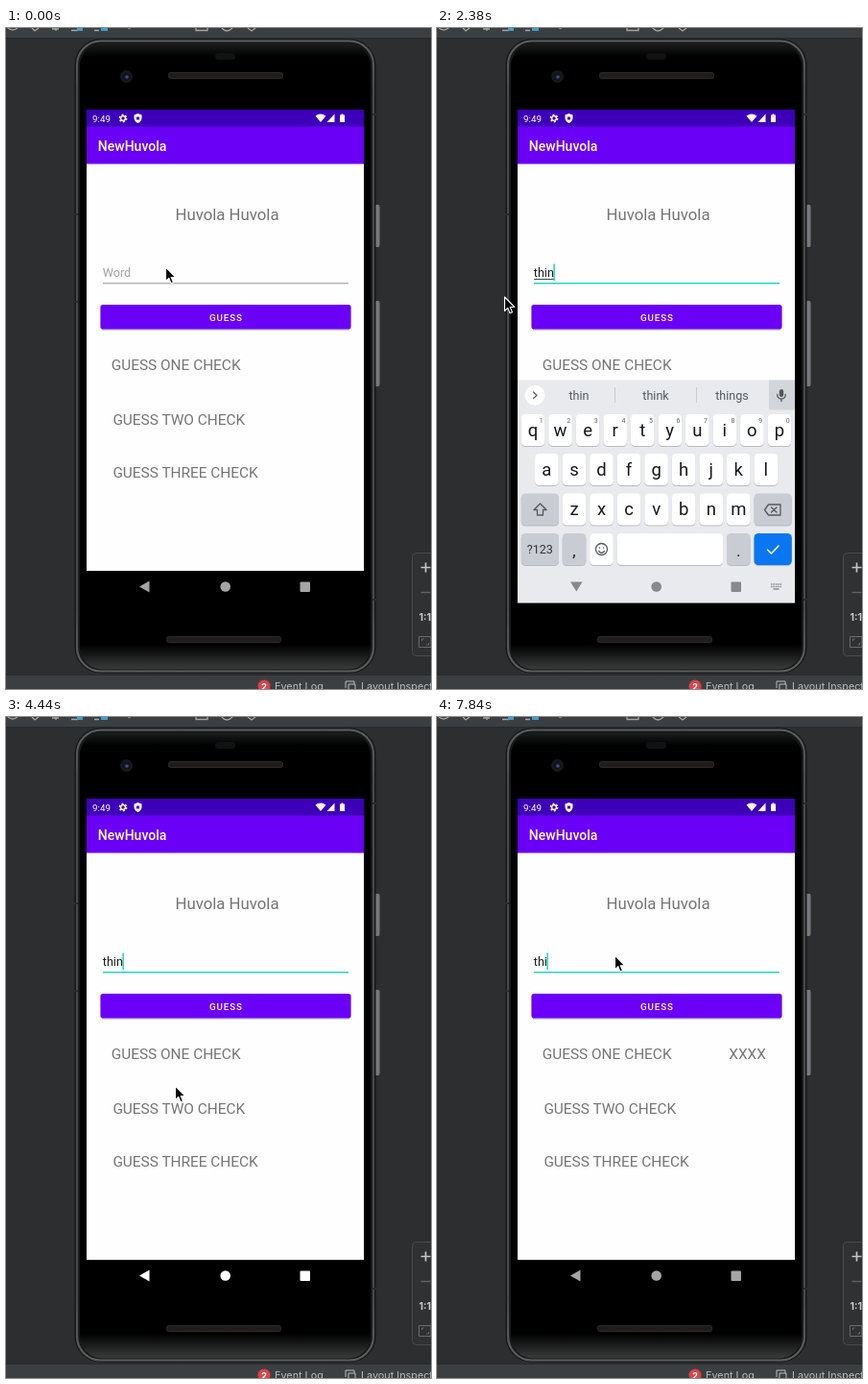
Write an HTML page that moves like this. It is 443x688 px and loops after 7.99 s.

```html
<!DOCTYPE html>
<html lang="en">
<head>
<meta charset="utf-8">
<title>Word game in a phone emulator</title>
<style>
  html, body { margin: 0; width: 100%; height: 100%; overflow: hidden; background: #2c2e30; }
  svg { display: block; width: 443px; height: 688px; font-family: Roboto, sans-serif; }
  .ide { font-family: Inter, sans-serif; fill: #b9bbbd; }
  .mid { text-anchor: middle; }
  .label { font-size: 15.4px; fill: #757575; }
  .line { fill: none; stroke: #55595e; stroke-width: 1.3; stroke-linecap: round; stroke-linejoin: round; }
  .word { font-size: 12.6px; text-anchor: middle; fill: #54595f; }
</style>
</head>
<body>
<svg viewBox="0 0 443 688">
  <defs>
    <linearGradient id="rim" x2="0" y2="1">
      <stop offset="0" stop-color="#5c5e5f"/><stop offset=".08" stop-color="#47494a"/>
      <stop offset=".9" stop-color="#47494a"/><stop offset="1" stop-color="#5c5e5f"/>
    </linearGradient>
    <linearGradient id="body" x2="0" y2="1">
      <stop offset="0" stop-color="#1c1d1d"/><stop offset=".02" stop-color="#000"/>
      <stop offset=".96" stop-color="#000"/><stop offset="1" stop-color="#3a3b3b"/>
    </linearGradient>
    <clipPath id="screenClip"><path d="M84 85H373V599H84Z"/></clipPath>
    <clipPath id="buttonClip"><rect x="98.400" y="288" width="261.200" height="25.500" rx="2.800"/></clipPath>
    <g id="gear" fill="none" stroke="currentColor">
      <circle r="2.9" stroke-width="1.8"/>
      <circle r="4.4" stroke-width="1.5" stroke-dasharray="2.3"/>
    </g>
  </defs>

  <!-- editor around the phone -->
  <path fill="#2c2e30" d="M0 0H443V688H0Z"/>
  <path fill="#3c3f41" d="M0 0H443V10H0ZM0 674H443V688H0Z"/>
  <path fill="#292a2c" d="M0 10H443V11H0ZM0 673H443V674H0Z"/>
  <g fill="none" stroke="#a3a5a7" stroke-width="1.3">
    <path d="M2 0Q7 4 12 0M27 0L30 3L34 0M48 1H55M52 0V3M68 2.5H75M92 2.5H97M198 0V2.5H210V0M225 0Q230 6 236 0M252 0L256 3L260 0"/>
    <path stroke="#3e9fd0" stroke-width="3" d="M74 1.5H80M99 1.5H106"/>
    <path stroke="#77797b" d="M127 .5H130"/>
  </g>
  <circle cx="269" cy="685" r="6.5" fill="#d9434a"/>
  <text class="mid" x="269" y="688.6" font-size="9.5" font-weight="700" fill="#fff" font-family="Inter, sans-serif">2</text>
  <text class="ide" x="280" y="689" font-size="10.8">Event Log</text>
  <path d="M354 687V680H363V683M357 688V683H364V688" fill="none" stroke="#b9bbbd"/>
  <text class="ide" x="370" y="689" font-size="10.8">Layout Inspector</text>
  <g transform="translate(.5 0)">
    <rect x="423" y="546.5" width="30" height="107" rx="4" fill="#2f3133" stroke="#494b4d"/>
    <path d="M432 561.5H442M437 556.5V566.5" stroke="#c4c6c8" stroke-width="1.7"/>
    <path d="M432 587.5H442" stroke="#606264" stroke-width="1.4"/>
    <text x="430" y="617" font-size="10.5" font-weight="700" fill="#c9cbcd" font-family="Inter, sans-serif">1:1</text>
    <path d="M430 633.5H442.5V644.5H430ZM433 638V636H435M440 640V642H438" fill="none" stroke="#696b6d"/>
  </g>

  <!-- phone body -->
  <path fill="#77797c" d="M384 184H388Q389.500 184 389.500 186V226Q389.500 228 388 228H384ZM384 284H388Q389.500 284 389.500 286V371Q389.500 373 388 373H384Z"/>
  <rect x="71.500" y="11.500" width="314" height="660" rx="27" fill="#141516"/>
  <rect x="74" y="13.500" width="309" height="656" rx="25" fill="#171818" stroke="url(#rim)" stroke-width="2.200"/>
  <rect x="77" y="16.500" width="303" height="651" rx="23" fill="url(#body)"/>
  <path stroke="#2a2c2d" stroke-width="2" d="M71 194H75M71 285H75M382 90H386M382 595H386"/>
  <rect x="218" y="26" width="21" height="7" rx="3.500" fill="#121215"/>
  <circle cx="125.500" cy="50.500" r="6.500" fill="#18191b"/>
  <circle cx="125.500" cy="50.500" r="4.200" fill="#10141f"/>
  <circle cx="126" cy="51" r="1.800" fill="#3d5180"/>
  <g fill="#1f1c1a" stroke="#2d2a28">
    <rect x="169.500" y="46.500" width="119" height="6" rx="2"/>
    <rect x="167.500" y="633.500" width="119" height="6" rx="2"/>
  </g>

  <!-- app -->
  <path fill="#fefefe" d="M84 85H373V565H84Z"/>
  <path fill="#6a00f5" d="M84 102H373V141.500H84Z"/>
  <path fill="#3d00b8" d="M84 85H373V102.500H84Z"/>
  <g fill="#fff" color="#fff">
    <text x="90" y="97.500" font-size="9.800">9:49</text>
    <use href="#gear" transform="translate(122 94) scale(.85)"/>
    <path d="M137.500 89L141.500 90.500V94Q141 97.500 137.500 99Q134 97.500 133.500 94V90.500Z"/>
    <path d="M322.500 91.500Q328 87.500 333.500 91.500L328 98ZM342.500 89.500V98H334.500ZM348 90.500H349.500V89.500H351.500V90.500H353V98H348Z"/>
    <text x="95.800" y="127.600" font-size="14" font-weight="500">NewHuvola</text>
  </g>
  <path fill="#3d00b8" d="M136 92.500H139V95.500H136Z"/>
  <text class="mid" x="230.500" y="200.300" font-size="16.800" fill="#757575">Huvola Huvola</text>
  <text id="entry" x="100.800" y="259.200" font-size="12.600"></text>
  <path id="composing" stroke="#333" stroke-width=".9"/>
  <path id="fieldLine" d="M101 265.800H357"/>
  <rect id="caret" y="245.500" width="1.500" height="17.500" fill="#19d3c2"/>
  <path d="M100 314H358" stroke="#000" stroke-opacity=".22" stroke-width="1.300"/>
  <g clip-path="url(#buttonClip)">
    <path fill="#6a00f5" d="M98 288H360V314H98Z"/>
    <circle id="ripple" cx="188" cy="302" fill="#fff"/>
  </g>
  <text x="212" y="304.500" font-size="9.800" font-weight="500" letter-spacing=".875" fill="#fff">GUESS</text>
  <g class="label">
    <text x="109.700" y="355.700">GUESS ONE CHECK</text>
    <text x="111.400" y="413">GUESS TWO CHECK</text>
    <text x="111.400" y="467.500">GUESS THREE CHECK</text>
    <text id="result" x="304.300" y="356">XXXX</text>
  </g>
  <g id="nav">
    <path d="M139 581.500L149.500 575.500V587.500Z"/>
    <circle cx="228.700" cy="581.500" r="5.300"/>
    <rect x="306.500" y="576.500" width="10.500" height="10.500" rx="1"/>
  </g>

  <!-- keyboard -->
  <g clip-path="url(#screenClip)"><g id="keyboard">
    <path fill="#e8eaee" d="M84 366.500H373V598.500H84Z"/>
    <path fill="#d2d5da" d="M346 366.500H373V397.500H346Z"/>
    <rect x="356.800" y="376" width="4.400" height="8" rx="2.200" fill="#55595e"/>
    <path class="line" d="M354.700 381.500Q355 386 359 386T363.300 381.500M359 386V388.500"/>
    <circle cx="102" cy="382.300" r="10.500" fill="#fff"/>
    <path id="chevron" class="line" stroke-width="1.500"/>
    <g id="tools">
      <path class="line" d="M135.500 377.500H145V383L141 387.500H135.500ZM145 383H141V387.500M138 380H138.500M142 380H142.500M138 383Q140 385 141 383"/>
      <text class="mid" x="181.500" y="385.800" font-size="9.500" font-weight="900" fill="#55595e">GIF</text>
      <path class="line" d="M219 377.500H228.500V388H219ZM222 377V375.800H225.500V377M221.500 381H226M221.500 383.500H226M221.500 386H224.500"/>
      <use href="#gear" x="265.700" y="382.500" color="#55595e"/>
      <path d="M291.500 374V391" stroke="#caccd0"/>
      <path d="M312.500 382.500H322" stroke="#55595e" stroke-width="2.800" stroke-linecap="round" stroke-dasharray="0 4.500"/>
    </g>
    <g id="suggestions">
      <path d="M185.500 374V390M270.500 374V390" stroke="#caccd0"/>
      <text class="word" x="148" y="387"></text>
      <text class="word" x="228" y="387"></text>
      <text class="word" x="307.500" y="387"></text>
    </g>
    <g id="keys"></g>
    <path class="line" stroke-width="1.500" d="M107.500 495L114 501.500H110.500V507H104.500V501.500H101Z"/>
    <path class="line" d="M345.500 496H358V507H345.500L341.500 501.500ZM348.500 499L354 504M354 499L348.500 504"/>
    <circle class="line" cx="171.500" cy="542.500" r="6"/>
    <path class="line" d="M169.300 541H169.500M173.500 541H173.700M168.500 544.500Q171.500 548 174.500 544.500"/>
    <path class="line" style="stroke:#fff;stroke-width:1.600" d="M344.500 543L348.500 547L356 539"/>
    <rect id="backPress" x="115" y="565" width="60" height="33.500" rx="16.500" fill="#cfd0d3"/>
    <g fill="#85888c">
      <path d="M139 576.500H151.500L145.300 586.500Z"/>
      <circle cx="228.700" cy="581.500" r="5.300"/>
      <rect x="306.500" y="576.500" width="10.500" height="10.500" rx="1"/>
    </g>
    <path d="M348 579H359M348 581.500H359" stroke="#85888c" stroke-width="1.400" stroke-dasharray="1.500 .9"/>
    <path d="M350.500 584H356.500" stroke="#85888c" stroke-width="1.400"/>
  </g></g>

  <path id="pointer" fill="#000" stroke="#fff" stroke-width="1.100" stroke-linejoin="round"
        d="M.5 0V14.500L3.800 11.400L6 16.800L8.500 15.700L6.200 10.500H10.800Z"/>
</svg>
<script>
const LOOP = 7990, TICKS = 54, FIELD_X = 100.8;
const $ = id => document.getElementById(id);
const words = [...document.querySelectorAll('.word')];

const key = (x, y, w, fill = '#fff') =>
  `<rect x="${x}" y="${y + 1}" width="${w}" height="33" rx="4.500" fill="#b9bcc1"/>
   <rect x="${x}" y="${y}" width="${w}" height="33" rx="4.500" fill="${fill}"/>`;
const glyph = (text, x, y, size = 18.5, fill = '#17181a') =>
  `<text class="mid" x="${x}" y="${y}" font-size="${size}" fill="${fill}">${text}</text>`;

function buildKeys() {
  const rows = [['qwertyuiop', 100, 402], ['asdfghjkl', 114.4, 443], ['zxcvbnm', 143, 484.5]];
  const letters = rows.map(([row, x0, y]) => [...row].map((letter, i) => {
    const x = x0 + i * 28.55;
    const digit = row.length === 10 ? glyph((i + 1) % 10, x + 8.7, y + 8.5, 7, '#5b5f64') : '';
    return key(x - 12.3, y, 24.6) + glyph(letter, x, y + 22.5) + digit;
  }).join('')).join('');
  const dark = '#c9ccd2';
  return letters
    + key(87.7, 484.5, 39.3, dark) + key(330.5, 484.5, 39.3, dark)
    + key(87.7, 526, 39.3, dark) + glyph('?123', 107.3, 547, 12.6, '#33363a')
    + key(130.7, 526, 24.6, dark) + glyph(',', 143, 550, 17)
    + key(159.2, 526, 24.6) + key(187.7, 526, 110.5)
    + key(302, 526, 24.6, dark) + glyph('.', 314.3, 550, 17)
    + key(330.5, 526, 39.3, '#0a76f2');
}

// Tracks are lists of [tick, ...values].
const hold = (track, tick) => track.filter(k => k[0] <= tick).pop().slice(1);
function tween(track, tick) {
  const i = track.findIndex(k => k[0] > tick);
  if (i < 0) return track[track.length - 1].slice(1);
  const [a, b] = [track[i - 1], track[i]];
  const p = (tick - a[0]) / (b[0] - a[0]);
  return a.slice(1).map((v, n) => v + (b[n + 1] - v) * p);
}

const pointerTrack = [[0, 166, 249], [1, 166, 249], [2, 156, 222], [4, 106, 194], [5, 78, 245], [6, 70, 280],
  [16, 70, 280], [23, 132, 541], [27, 140, 577], [28, 140, 577], [30, 176, 384], [31, 181, 325],
  [32, 185, 309], [34, 187.5, 302], [44, 187.5, 302], [49, 185, 248.3]];
const textTrack = [[0, ''], [10, 't'], [12, 'th'], [14, 'thi'], [16, 'thin'], [53, 'thi']];
const suggestTrack = [[0, ''], [12, 'th the that'], [14, 'thi think this'], [16, 'thin think things'], [27, '']];
const caretFlips = [1, 6, 9, 20, 23, 31, 34, 37, 41, 44, 47, 51, 53];
const keyboardTrack = [[0, 232], [1, 232], [2, 150], [3, 45], [4, 0], [28, 0], [29, 130], [30, 232]];
const navTrack = [[0, 165], [28, 165], [29, 255], [48, 255], [51, 165]];
const rippleTrack = [[0, 0, 0], [35, 0, 0], [36, 50, .2], [38, 180, .2], [41, 190, 0]];

const show = (id, on) => $(id).setAttribute('visibility', on ? 'inherit' : 'hidden');
const set = (id, attrs) => Object.entries(attrs).forEach(([name, v]) => $(id).setAttribute(name, v));

function render(ms) {
  const tick = Math.min(TICKS - 1, Math.floor((ms + 10) * TICKS / LOOP));

  const [text] = hold(textTrack, tick);
  $('entry').textContent = text || 'Word';
  set('entry', { fill: text ? '#1c1c1c' : '#a2a2a2' });
  const end = FIELD_X + (text ? $('entry').getComputedTextLength() : 0);
  set('caret', { x: end - .5 });
  show('caret', caretFlips.filter(t => t <= tick).length % 2);
  set('composing', { d: `M101 261.500H${end}` });
  show('composing', text && tick < 27);
  set('fieldLine', tick < 1 ? { stroke: '#929292', 'stroke-width': 1 } : { stroke: '#2cd3c5', 'stroke-width': 1.5 });

  const [radius, glow] = tween(rippleTrack, tick);
  set('ripple', { r: radius, opacity: glow });
  show('result', tick >= 37);
  const [grey] = tween(navTrack, tick);
  set('nav', { fill: `rgb(${grey},${grey},${grey})` });

  const [drop] = tween(keyboardTrack, tick);
  set('keyboard', { transform: `translate(0 ${drop})` });
  show('keyboard', drop < 232);
  const [list] = hold(suggestTrack, tick);
  const options = list.split(' ');
  words.forEach((node, i) => { node.textContent = options[i] || ''; });
  show('suggestions', list);
  show('tools', tick < 12);
  set('chevron', { d: tick < 12 ? 'M103.500 379L100 382.300L103.500 385.600' : 'M100.500 379L104 382.300L100.500 385.600' });
  show('backPress', tick >= 27 && tick < 30);

  const [x, y] = tween(pointerTrack, tick);
  set('pointer', { transform: `translate(${x} ${y})` });
}

$('keys').innerHTML = buildKeys();
const start = performance.now();
function loop() {
  render((performance.now() - start) % LOOP);
  requestAnimationFrame(loop);
}
loop();
</script>
</body>
</html>
```
